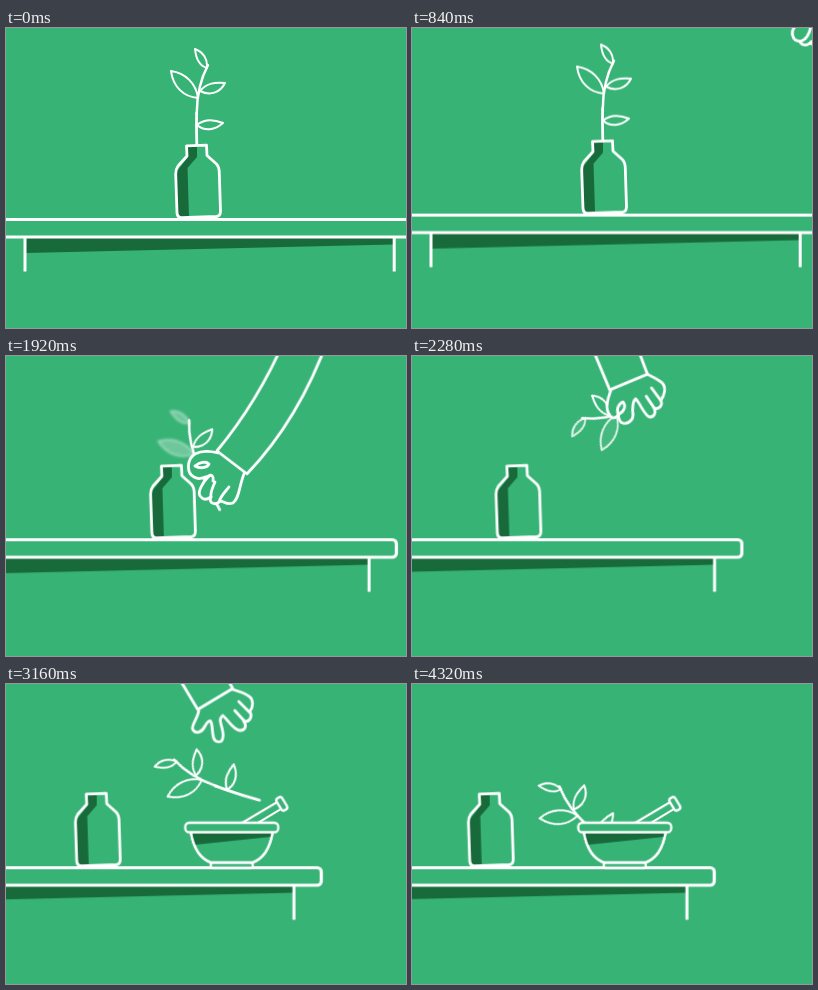
Animation of 400x300 px, one loop 4360 ms. Source, as an HTML page without scripts:

```html
<!DOCTYPE html>
<html lang="en">
<head>
<meta charset="utf-8">
<title>Herb and mortar</title>
<style>
html, body { margin: 0; width: 100%; height: 100%; overflow: hidden; background: #37b376; }
svg { display: block; width: 100vw; height: 100vh; }
svg * { animation: 4360ms linear infinite; }
.line { fill: none; stroke: #fff; stroke-width: 2.8; stroke-linecap: round; stroke-linejoin: round; }
.solid { fill: #37b376; }
.dark { fill: #186a3a; stroke: none; }
.thin { stroke-width: 2; }

#camera { animation-name: camera; }
@keyframes camera {
  0% { transform: translate(0, 0); }
  12.84% { transform: translate(0, -2.8px); }
  19.27% { transform: translate(0, -4.4px); }
  25.69% { transform: translate(0, -6px); }
  29.36% { transform: translate(0, -6.9px); }
  37.6% { transform: translate(0, -7.8px); }
  40.4% { transform: translate(-4px, -7.8px); }
  44.04% { transform: translate(-25px, -7.8px); }
  47.71% { transform: translate(-60px, -7.8px); }
  51.38% { transform: translate(-84px, -7.8px); }
  55.05% { transform: translate(-90.5px, -7.8px); }
  60.55% { transform: translate(-94.5px, -7.8px); }
  64.22% { transform: translate(-96.3px, -7.8px); }
  83.5% { transform: translate(-105.5px, -7.8px); }
  100% { transform: translate(-113.7px, -7.8px); }
}

#plant { animation-name: plant; }
@keyframes plant {
  0%, 33% { transform: translate(192px, 66px) rotate(0deg); }
  39.45% { transform: translate(196px, 44px) rotate(-3deg); }
  44.04% { transform: translate(211.5px, 102.5px) rotate(-25deg); }
  48.62% { transform: translate(244px, 86px) rotate(-70deg); animation-timing-function: ease-out; }
  55.05%, 67.9% { transform: translate(299.5px, 62.5px) rotate(-126deg); animation-timing-function: ease-in; }
  73.4% { transform: translate(290px, 116px) rotate(-52deg); animation-timing-function: ease-out; }
  76.1% { transform: translate(287px, 128px) rotate(-31deg); animation-timing-function: ease-in-out; }
  83.5% { transform: translate(287.5px, 127px) rotate(-36deg); }
  99.1%, 100% { transform: translate(276px, 136.8px) rotate(-49deg); }
}
#tail { animation-name: tail; animation-timing-function: step-end; }
@keyframes tail { 0% { opacity: 1; } 48.62% { opacity: 0; } 67.9%, 100% { opacity: 1; } }
.swish { animation-name: swish; }
@keyframes swish {
  0%, 40% { fill: #fff0; stroke: #fff; filter: blur(0); }
  43%, 48% { fill: #fff4; stroke: #fff6; filter: blur(1px); }
  54%, 100% { fill: #fff0; stroke: #fff; filter: blur(0); }
}

#reach { transform-origin: 250px 108px; animation-name: reach; }
@keyframes reach {
  0%, 15.5% { transform: translate(250px, -150px) rotate(-25deg); opacity: 1; }
  19.27% { transform: translate(194.5px, -116px) rotate(-20deg); animation-timing-function: ease-out; }
  27.5%, 33% { transform: translate(0, 0) rotate(0deg); }
  39.45% { transform: translate(4px, -22px) rotate(0deg); }
  44.04% { transform: translate(1px, 0) rotate(0deg); }
  48.6% { transform: translate(30px, -46px) rotate(-35deg); opacity: 1; }
  48.62%, 100% { transform: translate(30px, -46px) rotate(-35deg); opacity: 0; }
}
#fist { animation-name: fist; }
@keyframes fist {
  0%, 38% { d: path("M222 68C214 60 206 54 198 57C189 60 184 73 192 75C186 80 188 88 193 90C184 94 185 104 191 106C192 112 197 113 201 111C203 117 210 120 217 117C227 113 228 104 234 100C236 99 238 99 241 98"); }
  44.04%, 100% { d: path("M236 98C228 96 219 96 213 99C205 104 204 118 212 122C217 125 221 123 227 121C221 127 214 138 219 142C222 146 226 144 229 142C226 149 234 150 237 147C241 144 243 151 251 148C257 144 257 132 262 119"); }
}
#sleeve { animation-name: sleeve; }
@keyframes sleeve {
  0%, 38% { d: path("M330 -14Q275 38 222 67L241 98Q312 62 385 -16"); }
  44.04%, 100% { d: path("M304 -17Q276 47 235 96L265 119Q317 65 347 -17"); }
}
#gripA, #gripB { animation-timing-function: step-end; }
#gripA { animation-name: gripA; }
#gripB { animation-name: gripB; }
@keyframes gripA { 0% { opacity: 1; } 41%, 100% { opacity: 0; } }
@keyframes gripB { 0% { opacity: 0; } 41%, 100% { opacity: 1; } }

#drop { transform-origin: 215px 15px; animation-name: drop; }
@keyframes drop {
  0%, 48.6% { transform: translate(-30px, 46px) rotate(35deg); opacity: 0; }
  48.62% { transform: translate(-30px, 46px) rotate(35deg); opacity: 1; animation-timing-function: ease-out; }
  55.05%, 84% { transform: translate(0, 0) rotate(0deg); opacity: 1; animation-timing-function: ease-in; }
  91%, 100% { transform: translate(-14px, -75px) rotate(0deg); opacity: 1; }
}
#palm { animation-name: palm; }
@keyframes palm {
  0%, 67% { d: path("M199 27C197 36 197 45 200 49C203 54 207 54 209 51C210 50 210 49 210 49C211 55 214 58 218 57C224 55 226 50 224 45C223 40 222 34 225 31C230 35 236 46 241 47C246 47 247 42 245 38C250 38 253 33 250 29C254 21 253 14 248 11C243 8 238 7 233 5"); }
  70%, 100% { d: path("M199 27C198 35 191 42 193 46C196 51 202 49 205 43C207 39 210 36 211 38C214 44 211 56 217 58C223 60 224 54 223 48C222 41 218 36 223 32C228 36 233 46 240 47C246 47 247 42 244 38C250 39 253 33 250 28C254 23 254 15 248 12C244 9 239 8 233 6"); }
}
#pinch { animation-name: pinch; }
@keyframes pinch { 0%, 67% { opacity: 1; } 68.5%, 100% { opacity: 0; } }

#mortar { animation-name: mortar; }
@keyframes mortar {
  0%, 55.96% { transform: translate(330px, -30px) rotate(13deg); }
  60.55% { transform: translate(326px, 180.8px) rotate(7deg); }
  62.39% { transform: translate(326px, 191.5px) rotate(3deg); }
  64.22% { transform: translate(326px, 191.5px) rotate(-2deg); }
  66.5%, 100% { transform: translate(326px, 191.5px) rotate(0deg); }
}
#pestle { animation-name: pestle; }
@keyframes pestle {
  0%, 60.55% { transform: translate(7px, -38px) rotate(-76deg); animation-timing-function: ease-in; }
  64.22% { transform: translate(7px, -38px) rotate(-28deg); }
  66% { transform: translate(7px, -38px) rotate(-34deg); }
  68%, 100% { transform: translate(7px, -38px) rotate(-31deg); }
}
#streak { animation-name: streak; animation-timing-function: step-end; }
@keyframes streak { 0% { opacity: 1; } 61.5%, 100% { opacity: 0; } }
</style>
</head>
<body>
<svg viewBox="0 0 400 300">
  <rect class="solid" width="400" height="300"/>
  <g id="camera" class="line">
    <g id="plant">
      <g transform="translate(-192 -66)">
        <path stroke-width="2.500" d="M190.700 86C190.800 68 194 52 202 37"/>
        <g class="thin">
          <path class="swish" d="M192 70C178 69 167 59 165 43C179 45 190 55 192 70Z"/>
          <path class="swish" d="M201 40C194 38 190 31 189 21C197 24 202 31 201 40Z"/>
          <path d="M194 63C201 55 209 54 219 55C214 65 204 68 194 63Z"/>
        </g>
        <g id="tail">
          <path d="M190.700 85Q190 105 191.500 131"/>
          <path class="thin" d="M191 97C198 91 207 91 217 95C209 102 199 104 191 97Z"/>
        </g>
      </g>
    </g>

    <g id="bottle">
      <path class="solid" stroke="none" d="M181 117.500H201V128L214 140V188L172 189L170 142L181 128Z"/>
      <path class="dark" d="M182 118.500H191V129L181.500 140L183 189H174L171.500 184L170.500 144L182 129Z"/>
      <path d="M180.500 117.800L200.500 117.200L201 127.500L210.500 136Q213.300 139 213.300 145L214.500 183Q214.500 188 210.500 188.500L175.500 189.700Q171.500 189.700 171 185L169.700 146Q169.700 141 172 138L181 128Z"/>
    </g>

    <g id="table" stroke-linecap="butt">
      <path class="dark" d="M20 209H387V216.500L20 225Z"/>
      <rect class="solid" x="-20" y="191.500" width="435.500" height="17.500" rx="4" stroke-width="3.200"/>
      <path stroke-width="3" d="M19 209V243.500M388.200 209V243.500"/>
    </g>

    <g id="mortar" stroke-width="2.300">
      <path id="streak" stroke-width="2.800" d="M14 -101L16 -87"/>
      <g id="pestle">
        <path class="solid" d="M0 -4.200L47 -3.800V3.800L0 4.200"/>
        <rect class="solid" x="47" y="-7" width="6.500" height="14" rx="2.500"/>
      </g>
      <path class="solid" d="M-41 -36C-38 -18 -30 -8 -20 -5H20C30 -8 38 -18 41 -36"/>
      <path class="dark" d="M-40 -36H40L39.500 -31L-36.500 -23Q-39 -28 -40 -36Z"/>
      <path d="M-41 -36C-38 -18 -30 -8 -20 -5H20C30 -8 38 -18 41 -36"/>
      <rect class="solid" x="-21" y="-5" width="42" height="5" rx="2"/>
      <rect class="solid" x="-46.500" y="-45" width="93" height="9.500" rx="4"/>
    </g>

    <g transform="translate(0 6.900)">
      <g id="reach">
        <path id="fist" class="solid" d="M222 68"/>
        <path id="gripA" d="M192 75C199 79 207 77 210 73C211 67 204 65 198 69M193 90C199 93 207 88 209 84M191 106C197 108 203 102 206 97M201 111C207 111 211 106 213 102"/>
        <path id="gripB" d="M213 111C218 107 224 106 227 109C225 113 218 114 213 111M229 142C228 137 231 132 233 127M237 147C238 142 243 137 247 132M227 121C230 119 232 122 231 126"/>
        <path id="sleeve" class="solid" d="M222 67"/>
      </g>
    </g>

    <g transform="translate(94 7.300)">
      <g id="drop">
        <path id="palm" class="solid" d="M199 27"/>
        <path id="pinch" d="M210 49C207 44 209 38 213 36C217 40 215 46 210 49"/>
        <path d="M245 38L235 27M250 29L239 18"/>
        <path class="solid" d="M118 -110Q160 -37 198 26L233 5Q198 -56 165 -130"/>
      </g>
    </g>
  </g>
</svg>
</body>
</html>
```
